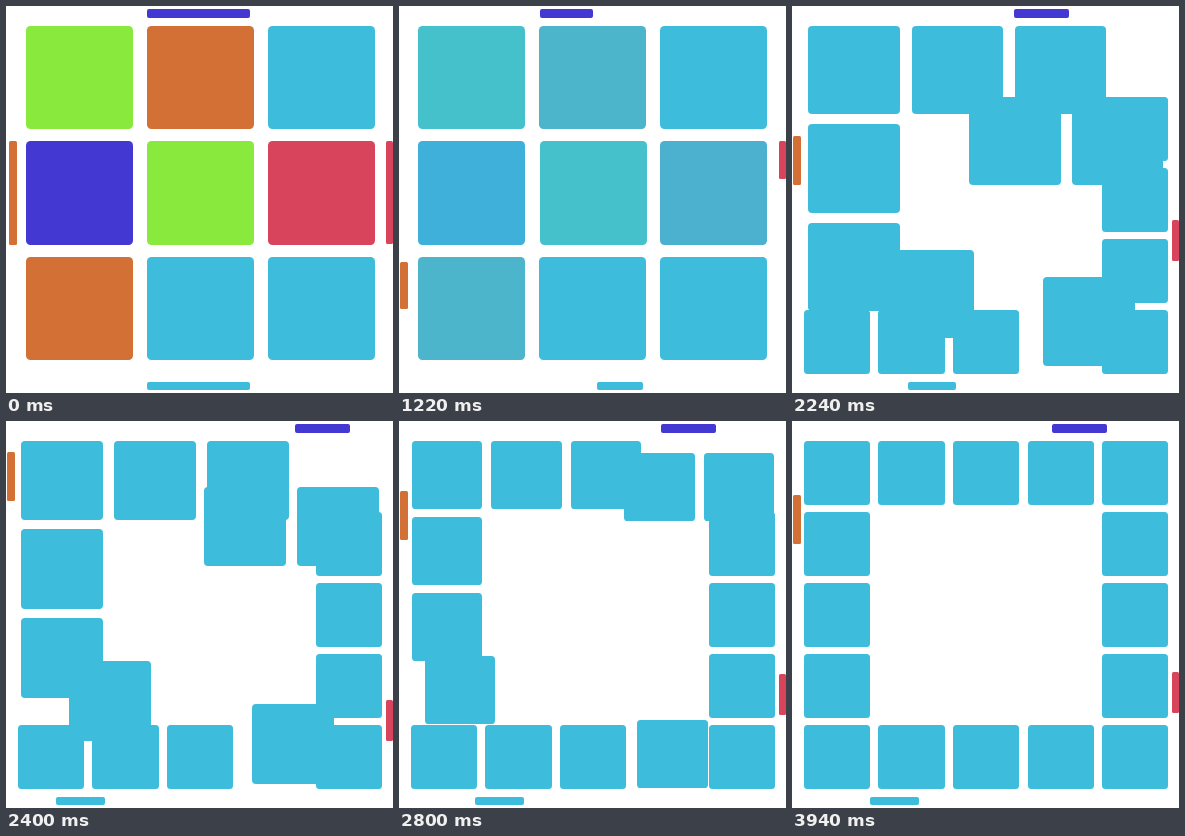
Recreate the animation shown at these times as an HTML page with a canvas. Size 387x387 px, loop 4740 ms.

```html
<!DOCTYPE html>
<html lang="en">
<head>
<meta charset="utf-8">
<title>Grid to ring</title>
<style>
html, body { margin: 0; width: 100%; height: 100%; overflow: hidden; background: #fff; }
canvas { display: block; width: 387px; height: 387px; }
</style>
</head>
<body>
<canvas id="stage" width="387" height="387"></canvas>
<script>
const ctx = document.getElementById('stage').getContext('2d');

const LOOP = 4740;
const RECOLOR = 380, RECOLOR_END = 1800;
const MOVE = 1960, MOVE_END = 3940;

const GREEN = [137, 233, 60], ORANGE = [210, 112, 54], CYAN = [61, 189, 219],
      BLUE = [67, 56, 210], RED = [216, 68, 92];

const tiles = [GREEN, ORANGE, CYAN, BLUE, GREEN, RED, ORANGE, CYAN, CYAN];

// Ring cells as [column, row]: where each tile goes, and which ones are new.
const goals = [[0, 0], [1, 0], [2, 0], [0, 1], [3, 0], [4, 0], [0, 2], [0, 3], [3, 4]];
const added = [[0, 4], [1, 4], [2, 4], [4, 1], [4, 2], [4, 3], [4, 4]];

// Start and length along the edge for the three states.
const bars = [
  { color: BLUE,   across: true,  edge: [3, 3],     thick: 9, pos: [141, 141, 260], len: [103, 55, 55] },
  { color: CYAN,   across: true,  edge: [376, 376], thick: 8, pos: [141, 196, 78],  len: [103, 48, 49] },
  { color: ORANGE, across: false, edge: [3, 1],     thick: 8, pos: [135, 251, 74],  len: [104, 49, 49] },
  { color: RED,    across: false, edge: [380, 380], thick: 7, pos: [135, 135, 251], len: [103, 41, 41] }
];

const lerp = (a, b, p) => a + (b - a) * p;
const mix = (a, b, p) => a.map((v, i) => Math.round(lerp(v, b[i], p)));

// Critically damped spring, time in ms.
function smooth(ms) {
  const x = 4.4 * Math.max(0, ms) / 1000;
  return 1 - (1 + x) * Math.exp(-x);
}

// Underdamped spring, time in ms.
function wobble(ms) {
  const t = Math.max(0, ms) / 1000, decay = 2.8, freq = 20.75;
  return 1 - Math.exp(-decay * t) *
    (Math.cos(freq * t) + decay / freq * Math.sin(freq * t));
}

// 0 before start, 1 after end, otherwise the spring with its lead time.
function phase(t, start, end, spring, lead) {
  return t < start ? 0 : t >= end ? 1 : spring(t - start + lead);
}

function box(x, y, w, h, r, color) {
  const l = Math.round(x), t = Math.round(y);
  ctx.fillStyle = `rgb(${color})`;
  ctx.beginPath();
  ctx.roundRect(l, t, Math.round(x + w) - l, Math.round(y + h) - t, r);
  ctx.fill();
}

const ringX = col => 11.8 + 74.6 * col;
const ringY = row => 19.5 + 71.2 * row;

function drawTiles(t) {
  const tint = phase(t, RECOLOR, RECOLOR_END, smooth, 44);
  const p = phase(t, MOVE, MOVE_END, smooth, 20);
  const w = lerp(107, 66.2, p), h = lerp(103.2, 64, p), r = lerp(4.5, 3.5, p);
  tiles.forEach((color, i) => {
    const col = i % 3, row = Math.floor(i / 3), [gc, gr] = goals[i];
    const x = 20 + 121 * col - (i === 4 ? 0 : tint);
    const y = 19.7 + 115.6 * row;
    box(lerp(x, ringX(gc), p), lerp(y, ringY(gr), p), w, h, r, mix(color, CYAN, tint));
  });
  if (t >= MOVE + 20) {
    for (const [c, row] of added) box(ringX(c), ringY(row), 66.2, 64, 3.5, CYAN);
  }
}

function drawBars(t) {
  const p = phase(t, RECOLOR, RECOLOR_END, wobble, -23);
  const q = phase(t, MOVE, MOVE_END, wobble, -12);
  const at = ([a, b, c]) => lerp(a, b, p) + (c - b) * q;
  for (const { color, across, edge, thick, pos, len } of bars) {
    const e = lerp(edge[0], edge[1], Math.min(1, p));
    const s = at(pos), n = at(len);
    if (across) box(s, e, n, thick, 2, color);
    else box(e, s, thick, n, 1.5, color);
  }
}

function draw(t) {
  ctx.fillStyle = '#fff';
  ctx.fillRect(0, 0, 387, 387);
  drawTiles(t);
  drawBars(t);
}

const began = performance.now();
function tick() {
  draw((performance.now() - began) % LOOP);
  requestAnimationFrame(tick);
}
tick();
</script>
</body>
</html>
```
